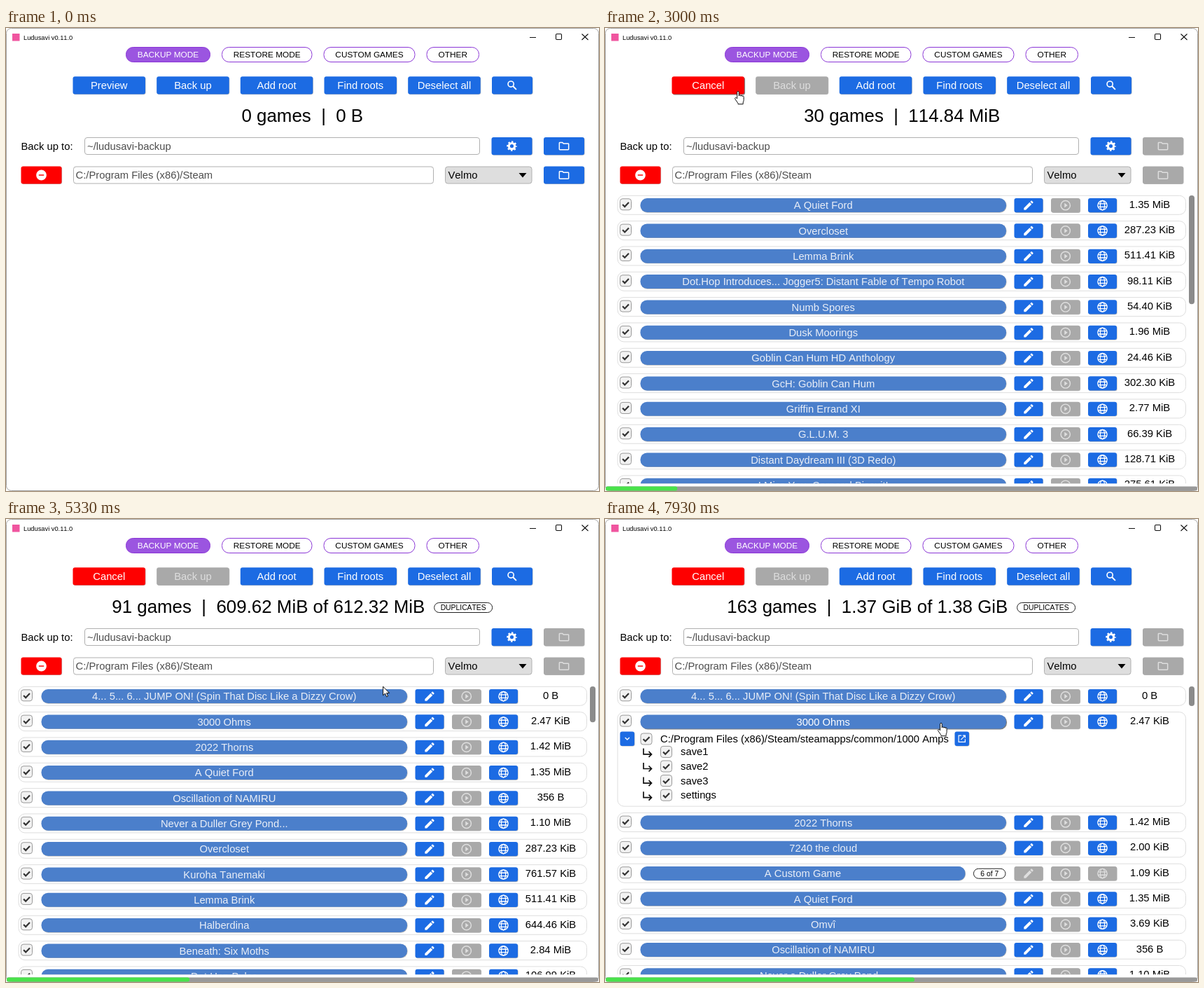
Write an HTML page that moves like this. It is 847 by 661 pixels and loops after 8 s.

```html
<!DOCTYPE html>
<html lang="en">
<head>
<meta charset="utf-8">
<title>Backup preview</title>
<style>
html, body { margin: 0; width: 100%; height: 100%; overflow: hidden; background: #fff; }
svg { display: block; width: 847px; height: 661px; }
text { font: 14.8px "Liberation Sans", Arial, sans-serif; font-kerning: none; white-space: pre; }
</style>
</head>
<body>
<svg id="stage" viewBox="0 0 847 661" xmlns="http://www.w3.org/2000/svg"></svg>
<script>
const stage = document.getElementById('stage');
const measure = document.createElement('canvas').getContext('2d');
const LOOP = 8000, STEP = 1000 / 15, LAST = 119;
const START = 24, EXPAND = 106, DUPLICATES = 60;
const BLUE = '#1c6be3', GRAY = '#a9a9a9', RED = '#fe0000', PILL = '#4b7fcb';

// title, size, step at which the scan finds it
const games = [
  ['4... 5... 6... JUMP ON! (Spin That Disc Like a Dizzy Crow)', '0 B', 58],
  ['3000 Ohms', '2.47 KiB', 62],
  ['2022 Thorns', '1.42 MiB', 73],
  ['7240 the cloud', '2.00 KiB', 97],
  ['A Custom Game', '1.09 KiB', 94, '6 of 7'],
  ['A Quiet Ford', '1.35 MiB', 44],
  ['Omvî', '3.69 KiB', 111],
  ['Oscillation of NAMIRU', '356 B', 50],
  ['Never a Duller Grey Pond...', '1.10 MiB', 79],
  ['Amid Oxen', '251.77 KiB', 84],
  ['Overcloset', '287.23 KiB', 33],
  ['Kuroha Tanemaki', '761.57 KiB', 60],
  ['Lemma Brink', '511.41 KiB', 40],
  ['Ochre Ranger Boltarn', '7.45 KiB', 88],
  ['Halberdina', '644.46 KiB', 47],
  ['Beneath: Six Moths', '2.84 MiB', 64],
  ['Dot.Hop Pulse', '106.99 KiB', 66],
  ['Dot.Hop Introduces... Jogger5: Distant Fable of Tempo Robot', '98.11 KiB', 38],
  ['Spade Puppy', '2.64 MiB', 57],
  ['Gloomriders', '90.31 KiB', 53],
  ['Numb Spores', '54.40 KiB', 29],
  ['Dusk Moorings', '1.96 MiB', 42],
  ['Sigmaglyph', '80.86 KiB', 49],
  ['Goblin Can Hum HD Anthology', '24.46 KiB', 39],
  ['GcH: Goblin Can Hum', '302.30 KiB', 45],
  ['Griffin Errand XI', '2.77 MiB', 35],
  ['G.L.U.M. 3', '66.39 KiB', 25],
  ['Distant Daydream III (3D Redo)', '128.71 KiB', 31],
  ['I Miss You, Corporal Biscuit!', '275.61 KiB', 28],
  ['Engravation', '17.35 MiB', 34],
  ['Dawns of Ochre', '16.01 MiB', 36],
  ['Maverick Runs', '871.00 KiB', 26],
  ['Brisk Escapade 2', '88.92 KiB', 30],
  ['Floundering', '3.93 KiB', 32],
  ['Overfable', '4.33 KiB', 31],
  ['Velvet Lantern Bay', '788.20 KiB', 35],
  ['Om: The Vow in Brastelune', '57.98 KiB', 27],
];

// step, games found, MiB, progress edge, duplicate MiB
const progress = [
  [24, 0, 0, 4, 0], [27, 3, 995.37 / 1024, 18, 0], [36, 14, 38.7, 62, 0],
  [55, 48, 199.44, 149, 2.7], [68, 74, 476.47, 208, 2.7],
  [90, 105, 720.57, 307, 2.7], [119, 163, 1403, 442, 8],
];

// step, x, y of the pointer tip
const pointer = [
  [3, 16, 141], [13, 190, 90.5], [49, 190, 90.5], [55, 365, 127], [66, 650, 126],
  [75, 650, 126], [83, 487, 291.5], [100, 487, 291.5], [104, 480, 291.5],
];

function sample(keys, k, ease = u => u) {
  let i = keys.findIndex(key => key[0] >= k);
  if (i < 0) return keys[keys.length - 1];
  if (i === 0) return keys[0];
  const a = keys[i - 1], b = keys[i], u = ease((k - a[0]) / (b[0] - a[0]));
  return a.map((v, j) => v + (b[j] - v) * u);
}
const smooth = u => u * u * (3 - 2 * u);

const rect = (x, y, w, h, r, fill, extra = '') =>
  `<rect x="${x}" y="${y}" width="${w}" height="${h}" rx="${r}" fill="${fill}" ${extra}/>`;
const label = (x, y, s, { fill = '#000', size = 14.8, anchor = 'middle', font = '' } = {}) =>
  `<text x="${x}" y="${y}" fill="${fill}" text-anchor="${anchor}" style="font-size:${size}px;${font}">${s}</text>`;
const left = { anchor: 'start' };
const stroke = (d, color, w = 2, extra = '') =>
  `<path d="${d}" fill="none" stroke="${color}" stroke-width="${w}" ${extra}/>`;

const gearTeeth = (Math.PI * 2 * 8.2 / 16).toFixed(3);
const icons = {
  pencil: () => '<path d="M3 17.25V21h3.75L17.81 9.94l-3.75-3.75zM20.71 7.04c.39-.39.39-1.02 0-1.41l-2.34-2.34c-.39-.39-1.02-.39-1.41 0l-1.83 1.83 3.75 3.75z"/>',
  play: c => `<circle cx="12" cy="12" r="9" fill="none" stroke="${c}" stroke-width="2"/><path d="M10 7.5v9l6-4.5z"/>`,
  globe: c => `<g fill="none" stroke="${c}" stroke-width="1.8"><circle cx="12" cy="12" r="9"/><ellipse cx="12" cy="12" rx="4.2" ry="9"/><path d="M3.8 9H20.2M3.8 15H20.2"/></g>`,
  folder: c => stroke('M3 18V6a1 1 0 0 1 1-1h5l2 2h9a1 1 0 0 1 1 1v10a1 1 0 0 1-1 1H4a1 1 0 0 1-1-1z', c),
  gear: c => `<g fill="none" stroke="${c}"><circle cx="12" cy="12" r="5.6" stroke-width="4.2"/><circle cx="12" cy="12" r="8.2" stroke-width="3.2" stroke-dasharray="${gearTeeth}" stroke-dashoffset="${gearTeeth / 2}"/></g>`,
  search: c => `<circle cx="9.5" cy="9.5" r="5.5" fill="none" stroke="${c}" stroke-width="2.2"/>` + stroke('M13.5 13.5L20 20', c, 2.6),
  minus: () => '<circle cx="12" cy="12" r="10"/>' + stroke('M7 12H17', RED),
  open: c => stroke('M11 4H4V20H20V13M14 4H20V10M20 4L9.5 14.5', c),
  chevron: c => stroke('M7 9.5L12 14.5L17 9.5', c),
};
const icon = (name, cx, cy, color, scale = 0.74) =>
  `<g transform="translate(${cx} ${cy}) scale(${scale}) translate(-12 -12)" fill="${color}">${icons[name](color)}</g>`;

function button(x, y, w, h, fill, hovered = false, r = 3) {
  const d = hovered ? 1.1 : 0.6;
  return rect(x + d, y + d, w, h, r, '#000', `opacity="${hovered ? 0.5 : 0.28}"`) + rect(x, y, w, h, r, fill);
}
const textButton = (x, s, fill, color = '#fff', hovered) =>
  button(x, 69.3, 103.5, 25.2, fill, hovered) + label(x + 51.75, 87.2, s, { fill: color });
const iconButton = (x, y, w, h, name, enabled = true, fill = BLUE) =>
  button(x, y, w, h, enabled ? fill : GRAY) + icon(name, x + w / 2, y + h / 2, enabled ? '#fff' : '#dedede');
const field = (x, y, w, h, fill = '#fff') => rect(x, y, w, h, 3.5, fill, 'stroke="#b0b0b0"');
const checkbox = (x, y) => rect(x, y, 16, 16, 3.5, '#f2f2f2', 'stroke="#999"') +
  stroke(`M${x + 3.6} ${y + 8.2}l3.1 3.1 5.8-6`, '#333', 2.2);
const badge = (x, y, w, s) => rect(x, y, w, 14, 7, '#fff', 'stroke="#222"') +
  label(x + w / 2, y + 10.7, s, { size: 10.36 });

function navTab(x, w, s, active) {
  return rect(x, 27.5, w, 21, 10, active ? '#9b55e0' : '#fff', 'stroke="#8a35d6"') +
    label(x + w / 2, 42.2, s, { size: 11.84, fill: active ? '#fff' : '#000' });
}

function windowFrame() {
  return rect(0.5, 0.5, 846, 660, 7, '#fff', 'stroke="#a2a2a2"') +
    rect(9, 8, 10.5, 10.5, 0, '#f0559f') +
    label(25, 16.6, 'Ludusavi v0.11.0', { anchor: 'start', size: 9.3, font: 'font-family:"Open Sans","Noto Sans",sans-serif' }) +
    stroke('M748 13.5H757M822.5 8.5L831.5 17M831.5 8.5L822.5 17', '#111', 1.1) +
    rect(785.5, 8.5, 8, 8, 1.2, 'none', 'stroke="#111" stroke-width="1.1"') +
    navTab(171.5, 120, 'BACKUP MODE', true) + navTab(308.5, 128.5, 'RESTORE MODE') +
    navTab(454, 130, 'CUSTOM GAMES') + navTab(601, 74.5, 'OTHER');
}

function controls(scanning, hovered) {
  return (scanning ? textButton(95.5, 'Cancel', RED, '#fff', hovered) : textButton(95.5, 'Preview', BLUE, '#fff', hovered)) +
    textButton(215.2, 'Back up', scanning ? GRAY : BLUE, scanning ? '#dedede' : '#fff') +
    textButton(334.8, 'Add root', BLUE) + textButton(454.5, 'Find roots', BLUE) +
    textButton(574.2, 'Deselect all', BLUE) + iconButton(694, 69.3, 58, 25.2, 'search') +
    label(21.5, 174, 'Back up to:', left) + field(112.5, 156.5, 564, 24) +
    label(116, 174, '~/ludusavi-backup', { ...left, fill: '#4d4d4d' }) +
    iconButton(693.5, 156, 58, 25.2, 'gear') + iconButton(768, 156, 58, 25.2, 'folder', !scanning) +
    iconButton(21.5, 197.5, 58, 25, 'minus', true, RED) + field(96.5, 198, 514, 24) +
    label(99.5, 215.2, 'C:/Program Files (x86)/Steam', { ...left, fill: '#4d4d4d' }) +
    field(627.5, 198, 123.5, 24, '#dedede') + label(631.5, 215.2, 'Velmo', left) +
    '<path d="M732.5 207h11l-5.5 6.5z"/>' +
    iconButton(768, 197.5, 58, 25, 'folder', !scanning);
}

function formatSize(mib) {
  if (mib === 0) return '0 B';
  if (mib < 1) return (mib * 1024).toFixed(2) + ' KiB';
  return mib < 1024 ? mib.toFixed(2) + ' MiB' : (mib / 1024).toFixed(2) + ' GiB';
}

function heading(k, count, mib, extra) {
  const repeated = k >= DUPLICATES;
  const s = `${count} games  |  ${formatSize(mib)}` + (repeated ? ` of ${formatSize(mib + extra)}` : '');
  measure.font = '25.9px "Liberation Sans", Arial, sans-serif';
  const w = measure.measureText(s).width;
  const x = 423.3 - (w + (repeated ? 97 : 0)) / 2;
  return label(x, 134.2, s, { ...left, size: 25.9 }) +
    (repeated ? badge(x + w + 13.3, 119.5, 83, 'DUPLICATES') : '');
}

function fileTree() {
  const files = ['save1', 'save2', 'save3', 'settings'].map((name, i) => {
    const y = 332.4 + i * 20.6;
    return stroke(`M55 ${y - 5}v8.5h11M62.5 ${y - .5}l4 4-4 4`, '#111', 1.7) +
      checkbox(79.5, y - 8) + label(108, y + 5, name, left);
  });
  return button(21.5, 303.5, 20.5, 20.5, BLUE) + icon('chevron', 31.8, 313.5, '#fff', 0.62) +
    checkbox(51, 306) +
    label(79, 319, 'C:/Program Files (x86)/Steam/steamapps/common/1000 Amps', left) +
    button(499.5, 303.5, 20.5, 20.5, BLUE) + icon('open', 509.8, 313.7, '#fff', 0.58) + files.join('');
}

function gameRow([title, size, , part], y, hovered, open) {
  const w = part ? 464 : 522.5;
  return rect(18, y + 0.5, 811.5, open ? 134.5 : 27, 9, '#fff', 'stroke="#dedede"') +
    checkbox(21.5, y + 5) + button(50.5, y + 4.3, w, 20, PILL, hovered, 9.5) +
    label(50.5 + w / 2, y + 19.5, title, { fill: hovered ? '#fff' : '#e9eef7' }) +
    (part ? badge(526.5, y + 7.5, 45.5, part) : '') +
    iconButton(584.5, y + 4.2, 41, 20.3, 'pencil', !part) +
    iconButton(637, y + 4.2, 41.5, 20.3, 'play', false) +
    iconButton(690, y + 4.2, 41, 20.3, 'globe', !part) +
    label(778, y + 17.8, size) + (open ? fileTree() : '');
}

function gameList(rows, k, count, tipX, tipY) {
  const view = 411.5, pitch = 36.33;
  let y = 238.8, out = '', overRow = false;
  for (const game of rows) {
    if (y > 650) break;
    const hovered = tipX > 50 && tipX < 573 && tipY > y + 4 && tipY < y + 25;
    const open = game === games[1] && k >= EXPAND;
    overRow = overRow || hovered;
    out += gameRow(game, y, hovered, open);
    y += pitch + (open ? 107.6 : 0);
  }
  const content = count * pitch + (k >= EXPAND ? 107.6 : 0);
  const bar = content > view ? rect(834, 239, 8, view * view / content, 4, '#8b8b8b') : '';
  return { overRow, svg: `<clipPath id="view"><rect x="0" y="238" width="847" height="412.3"/></clipPath><g clip-path="url(#view)">${out}</g>${bar}` };
}

function cursor(x, y, hand) {
  const d = hand
    ? 'M-1.3 10.3V1.2a1.3 1.3 0 0 1 2.6 0V6.4q0-1 1.2-1t1.3 1.3q0-.9 1.2-.9t1.2 1.3q.1-.7 1-.7t1 1.5V12q0 2-1 3.5V18.2H0V17L-4 11.2q-1-1.7.3-2.2q1-.3 2.4 1.3z'
    : 'M0 0V12.6l2.9-2.7 2.1 4.8 2-.9-2-4.5h4z';
  return `<path transform="translate(${x} ${y})" d="${d}" fill="#fff" stroke="#111" stroke-width="1" stroke-linejoin="round"/>`;
}

function render(k) {
  const scanning = k >= START;
  const [, found, mib, edge, extra] = sample(progress, k);
  const [, x, y] = sample(pointer, k, smooth);
  const shown = k >= pointer[0][0];
  const overMain = shown && x > 95.5 && x < 199 && y > 69 && y < 95;
  const rows = games.filter(game => game[2] <= k);
  const count = k <= 36 ? rows.length : Math.round(found);
  const list = gameList(rows, k, count, x, y);
  stage.innerHTML = windowFrame() + controls(scanning, overMain) +
    heading(k, count, mib, extra) + list.svg +
    (scanning ? rect(1, 654.5, 845, 6, 2.5, '#999') + rect(1, 654.5, edge - 1, 6, 2.5, '#49e24b') : '') +
    (shown ? cursor(x, y, overMain || list.overRow) : '');
}

let drawn = -1;
const origin = performance.now();
function tick() {
  const t = (performance.now() - origin) % LOOP;
  const k = Math.min(LAST, Math.floor((t + 4) / STEP));
  if (k !== drawn) render(drawn = k);
  requestAnimationFrame(tick);
}
tick();
</script>
</body>
</html>
```
